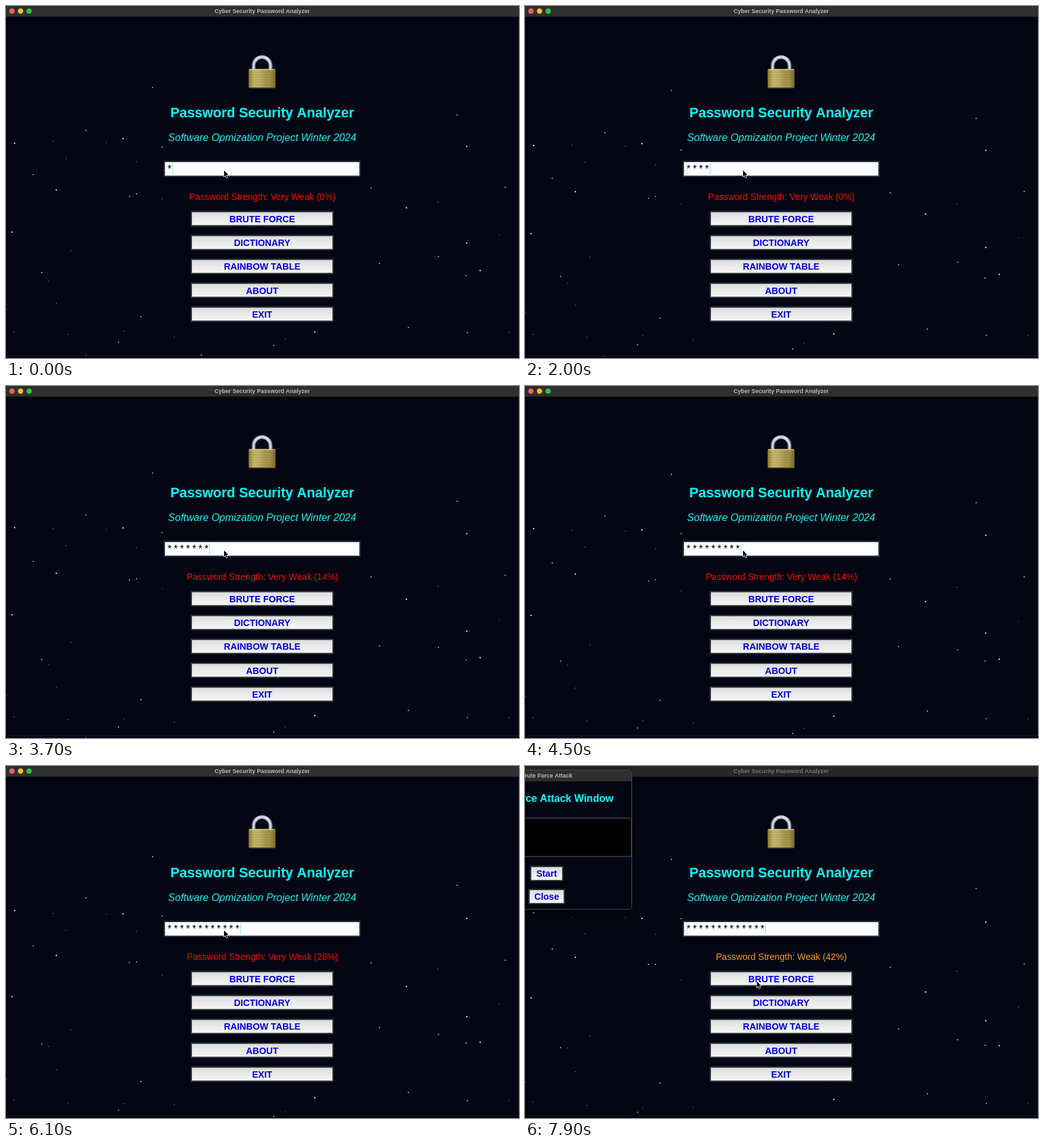
Recreate the animation shown at these times as an HTML page with a canvas. Size 800x550 px, loop 8 s.

```html
<!DOCTYPE html>
<html lang="en">
<head>
<meta charset="utf-8">
<title>Cyber Security Password Analyzer</title>
<style>
  html, body { margin: 0; width: 100%; height: 100%; overflow: hidden; background: #000; }
  canvas { display: block; width: 800px; height: 550px; }
</style>
</head>
<body>
<canvas id="stage" width="800" height="550"></canvas>
<script>
const ctx = document.getElementById('stage').getContext('2d');
const SANS = '"Liberation Sans", Arial, sans-serif';
const MONO = '"Liberation Mono", "Courier New", monospace';
const LOOP = 8000, STEP = 100;
const NIGHT = '#040713', CYAN = '#00ffff';

// x, y at start, fall speed in px per second
const bright = [
  13,214,1.9, 78,287,1.45, 182,207,3.9, 9,353,1.15, 718,219,3.1,
  624,315,4.8, 739,413,3, 481,509,1.5, 718,370,3.5
];
const middling = [
  228,127,2.35, 703,170,2.65, 124,194,1.9, 42,263,2.9, 569,284,3.8,
  778,283,3.3, 582,402,1.05, 674,391,4.6, 717,421,1.9, 627,502,1.25,
  719,510,2.1, 210,485,1.25, 417,530,2.8, 203,293,2.1, 243,220,2.3,
  192,297,1.6, 175,525,2, 304,545,2.3, 55,416,3
];
const dim = [
  73,211,3.2, 93,238,3, 203,243,2.5, 243,301,4.2, 673,306,1.8,
  769,357,2.4, 66,430,1.3, 101,382,5, 0,473,2.6, 12,509,2,
  78,464,1.7, 96,513,2.2, 183,508,3.2, 262,517,2, 435,520,3.3,
  784,510,2.1, 156,213,3, 124,545,1
];

function text(str, x, y, font, color, align = 'center') {
  ctx.font = font;
  ctx.fillStyle = color;
  ctx.textAlign = align;
  ctx.fillText(str, x, y);
}

function rect(x, y, w, h, color) {
  ctx.fillStyle = color;
  ctx.fillRect(x, y, w, h);
}

function disc(x, y, r, color) {
  ctx.fillStyle = color;
  ctx.beginPath();
  ctx.arc(x, y, r, 0, Math.PI * 2);
  ctx.fill();
}

function gradient(x0, y0, x1, y1, colors) {
  const g = ctx.createLinearGradient(x0, y0, x1, y1);
  colors.forEach((c, i) => g.addColorStop(i / (colors.length - 1), c));
  return g;
}

function stars(list, r, color, sec) {
  for (let i = 0; i < list.length; i += 3) {
    const y = list[i + 1] + list[i + 2] * sec;
    if (y < 549) disc(list[i] + 0.5, y + 0.3, r, color);
  }
}

function button(label, cx, cy, w) {
  const x = cx - w / 2, y = cy - 11.5;
  rect(x - 0.5, y - 0.5, w + 1, 24, '#34363a');
  rect(x + 1.5, y + 1.5, w - 3, 20, gradient(0, y, 0, y + 23, ['#dadada', '#ebebeb', '#f7f7f7']));
  text(label, cx, cy + 5.4, 'bold 14.2px ' + SANS, '#0000e6');
}

function titleBar(active) {
  rect(0, 0, 800, 17, active ? '#2f2f2f' : '#272727');
  rect(0, 16.5, 800, 0.5, '#111');
  if (active) {
    ['#ff5f57', '#febc2e', '#28c840'].forEach((c, i) => disc(9.3 + i * 13.4, 8, 4.2, c));
  } else {
    for (let i = 0; i < 3; i++) disc(9.3 + i * 13.4, 8, 4.2, '#343434');
  }
  text('Cyber Security Password Analyzer', 399.5, 11, 'bold 9px ' + SANS, active ? '#b8b8b8' : '#747474');
}

function padlock() {
  const arch = () => {
    ctx.beginPath();
    ctx.moveTo(386, 100);
    ctx.lineTo(386, 93);
    ctx.arc(399.3, 93, 13.3, Math.PI, 0);
    ctx.lineTo(412.6, 100);
    ctx.stroke();
  };
  ctx.lineWidth = 5.6;
  ctx.strokeStyle = gradient(383, 0, 416, 0, ['#69718a', '#b9c1d3', '#a3abbf', '#c5cbd9', '#737b92']);
  arch();
  ctx.lineWidth = 1.8;
  ctx.strokeStyle = '#e3e8f2';
  arch();

  ctx.fillStyle = gradient(378.5, 0, 420.5, 0, ['#8f803b', '#c9ba69', '#c0b066', '#a99b53', '#a0924a', '#776a2e']);
  ctx.beginPath();
  ctx.roundRect(378.5, 98.5, 41.8, 29.8, 1.8);
  ctx.fill();
  rect(379.5, 98.7, 39.8, 1.2, '#dfd18b');
  for (let y = 103; y < 126; y += 4) rect(379, y, 41, 0.8, 'rgba(80,68,20,.28)');
  rect(379.5, 127, 39.8, 1.2, '#655924');
}

function entry(count, caret) {
  rect(246, 242, 307, 25, '#2d373f');
  rect(248, 244, 303, 21, '#fff');
  text('*'.repeat(count), 250.3, 260, '16px ' + MONO, '#000', 'left');
  if (caret) rect(250 + count * 9.6, 246, 1, 17, '#85e2e2');
}

function strength(count) {
  const score = count < 7 ? 0 : 14 * Math.floor((count - 4) / 3);
  const weak = score >= 40;
  text(`Password Strength: ${weak ? 'Weak' : 'Very Weak'} (${score}%)`, 399.8, 303,
    '14.1px ' + SANS, weak ? '#ff9a14' : '#fa0000');
}

function pointer(x, y) {
  ctx.beginPath();
  [[0, 0], [0, 9.6], [2.2, 7.6], [3.8, 11.2], [5.4, 10.5], [3.9, 7], [6.8, 6.8]]
    .forEach(([dx, dy]) => ctx.lineTo(x + dx, y + dy));
  ctx.closePath();
  ctx.lineJoin = 'round';
  ctx.lineWidth = 1.4;
  ctx.strokeStyle = '#fff';
  ctx.stroke();
  ctx.fillStyle = '#000';
  ctx.fill();
}

function dialog() {
  const frame = () => {
    ctx.beginPath();
    ctx.roundRect(-99.5, 6.5, 266, 217.5, 6);
  };
  ctx.save();
  ctx.shadowColor = 'rgba(0,0,0,.75)';
  ctx.shadowBlur = 22;
  ctx.shadowOffsetY = 8;
  frame();
  ctx.fillStyle = NIGHT;
  ctx.fill();
  ctx.restore();

  ctx.save();
  frame();
  ctx.clip();
  rect(-100, 6, 267, 18, '#2e2e2e');
  rect(-100, 80.5, 267, 62, '#34363a');
  rect(-98, 82.5, 263, 58, '#000');
  ctx.restore();
  frame();
  ctx.lineWidth = 1;
  ctx.strokeStyle = '#4a4a4c';
  ctx.stroke();

  text('Brute Force Attack', 33.5, 18, 'bold 9px ' + SANS, '#b8b8b8');
  text('Brute Force Attack Window', 33.5, 56, 'bold 16px ' + SANS, CYAN);
  button('Start', 33.8, 168, 51);
  button('Close', 33.8, 204, 56);
}

function draw(t) {
  const open = t >= 7700;
  const count = Math.min(13, 1 + Math.floor(t / 540));
  const phase = t % 900;

  rect(0, 0, 800, 550, NIGHT);
  stars(dim, 0.7, 'rgba(255,255,255,.5)', t / 1000);
  stars(middling, 0.85, 'rgba(255,255,255,.88)', t / 1000);
  stars(bright, 1.1, '#fff', t / 1000);
  rect(0, 546, 800, 1, '#15171f');
  rect(799, 17, 1, 530, '#1b1d25');
  titleBar(!open);

  padlock();
  text('Password Security Analyzer', 399.5, 173.5, 'bold 21.4px ' + SANS, CYAN);
  text('Software Opmization Project Winter 2024', 399.5, 210.6, 'italic 16px ' + SANS, '#0cf4f4');
  entry(count, phase < 300 || phase >= 600);
  strength(count);
  ['BRUTE FORCE', 'DICTIONARY', 'RAINBOW TABLE', 'ABOUT', 'EXIT']
    .forEach((label, i) => button(label, 399.5, 332.3 + i * 37.3, 222));

  if (open) dialog();
  const k = Math.min(1, Math.max(0, (t - 7100) / 400));
  const ease = k * k * (3 - 2 * k);
  pointer(340 + 21.5 * ease, 257 + 79.5 * ease);
}

function tick() {
  const t = performance.now() % LOOP;
  draw(Math.floor(t / STEP) * STEP);
  requestAnimationFrame(tick);
}
tick();
</script>
</body>
</html>
```
